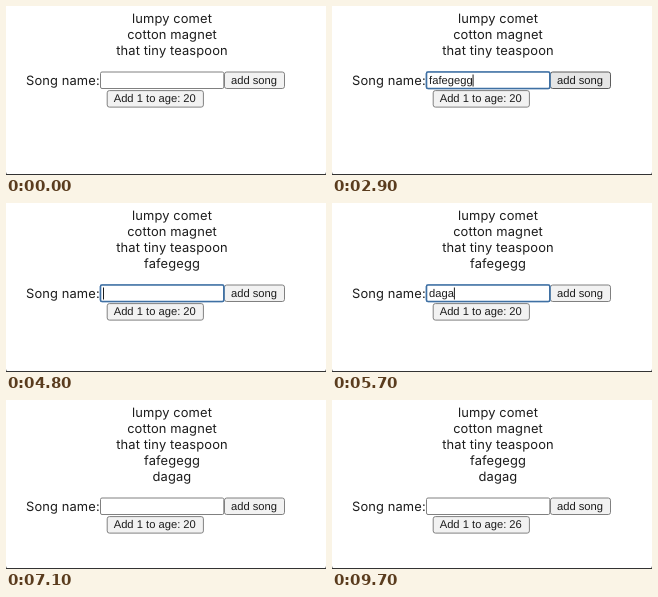
These frames come from a looping animation (320x169 px, 9800 ms). An HTML page:

```html
<!DOCTYPE html>
<html lang="en">
<head>
<meta charset="utf-8">
<title>Song list</title>
<style>
  html, body { margin: 0; width: 100%; height: 100%; overflow: hidden; background: #fff; }
  svg { display: block; width: 100%; height: 100%; text-rendering: geometricPrecision; }
  .page { font: 12.9px Inter, "Open Sans", sans-serif; letter-spacing: .12px; fill: #1c1c1c; }
  .ctl { font: 11.2px "Liberation Sans", Arial, sans-serif; fill: #1c1c1c; white-space: pre; }
  .box { stroke: #808080; stroke-width: 1; }
  .button { fill: #f2f2f2; }
  .button.hover { fill: #e6e6e6; stroke: #5c5c5c; }
  .input { fill: #fff; }
  .input.hover { stroke: #5c5c5c; }
  .input.focus { stroke: #3f70a3; stroke-width: 1.6; filter: drop-shadow(0 0 .5px #8fb2d6); }
</style>
</head>
<body>
<svg viewBox="0 0 320 169">
  <rect y="168" width="320" height="1" fill="#333"/>
  <path d="M0 165.5V169H3.5Q0 169 0 165.5ZM320 165.5V169H316.5Q320 169 320 165.5Z" fill="#333"/>
  <g class="page" id="list" text-anchor="middle"></g>
  <g id="form">
    <text class="page" x="20" y="78.6">Song name:</text>
    <rect class="box button" id="add" x="218.5" y="66" width="60" height="16.5" rx="2.2"/>
    <text class="ctl" x="225" y="78.3">add song</text>
    <rect class="box input" id="input" x="94.5" y="66" width="123.3" height="16.5" rx="1.5"/>
    <text class="ctl" id="typed" x="97.1" y="78.2"></text>
    <rect id="caret" y="68.5" width="1" height="12" fill="#1c1c1c"/>
    <rect class="box button" id="age" x="101.2" y="84.6" width="96.2" height="16.5" rx="2.2"/>
    <text class="ctl" id="count" x="107.7" y="96.4"></text>
  </g>
</svg>
<script>
const LOOP = 9800, LINE = 16;
const $ = id => document.getElementById(id);
const songs = ["lumpy comet", "cotton magnet", "that tiny teaspoon", "fafegegg", "dagag"];

// Each track is a list of [start in ms, value].
const tracks = {
  songs: [[0, 3], [3400, 4], [7000, 5]],
  typed: [[0, ""], [1700, "fa"], [1900, "faf"], [2100, "fafe"], [2200, "fafeg"],
    [2500, "fafege"], [2600, "fafegeg"], [2700, "fafegegg"], [3400, ""],
    [5000, "d"], [5300, "da"], [5500, "dag"], [5700, "daga"], [5900, "dagag"], [7000, ""]],
  focus: [[0, false], [800, true], [3300, false], [4800, true], [7000, false]],
  caret: [[0, false], [800, true], [1300, false], [1700, true], [3300, false],
    [4800, true], [6400, false], [6900, true], [7000, false]],
  hover: [[0, ""], [800, "input"], [2900, "add"], [3400, ""], [3800, "input"],
    [3900, "age"], [4200, "input"], [6500, "add"], [7000, ""],
    [7400, "input"], [7500, "age"], [9700, ""]],
  age: [[0, 20], [8200, 21], [8500, 22], [8700, 23], [8900, 24], [9100, 25], [9300, 26]]
};

const at = (track, t) => track.findLast(step => step[0] <= t)[1];

const rows = songs.map((name, i) => {
  const row = document.createElementNS("http://www.w3.org/2000/svg", "text");
  row.setAttribute("x", 166);
  row.setAttribute("y", 16.7 + i * LINE);
  row.textContent = name;
  return $("list").appendChild(row);
});

function setText(node, text) {
  if (node.textContent !== text) node.textContent = text;
}

function render(t) {
  const s = {};
  for (const key in tracks) s[key] = at(tracks[key], t);

  rows.forEach((row, i) => row.setAttribute("visibility", i < s.songs ? "visible" : "hidden"));
  $("form").setAttribute("transform", `translate(0 ${(s.songs - 3) * LINE})`);
  for (const id of ["input", "add", "age"]) $(id).classList.toggle("hover", s.hover === id);
  $("input").classList.toggle("focus", s.focus);
  setText($("typed"), s.typed);
  setText($("count"), "Add 1 to age: " + s.age);
  const width = s.typed ? $("typed").getComputedTextLength() : 0;
  $("caret").setAttribute("x", 97 + width);
  $("caret").setAttribute("visibility", s.caret ? "visible" : "hidden");
}

const start = performance.now();
function frame(now) {
  render(Math.max(0, now - start) % LOOP);
  requestAnimationFrame(frame);
}
render(0);
requestAnimationFrame(frame);
</script>
</body>
</html>
```
